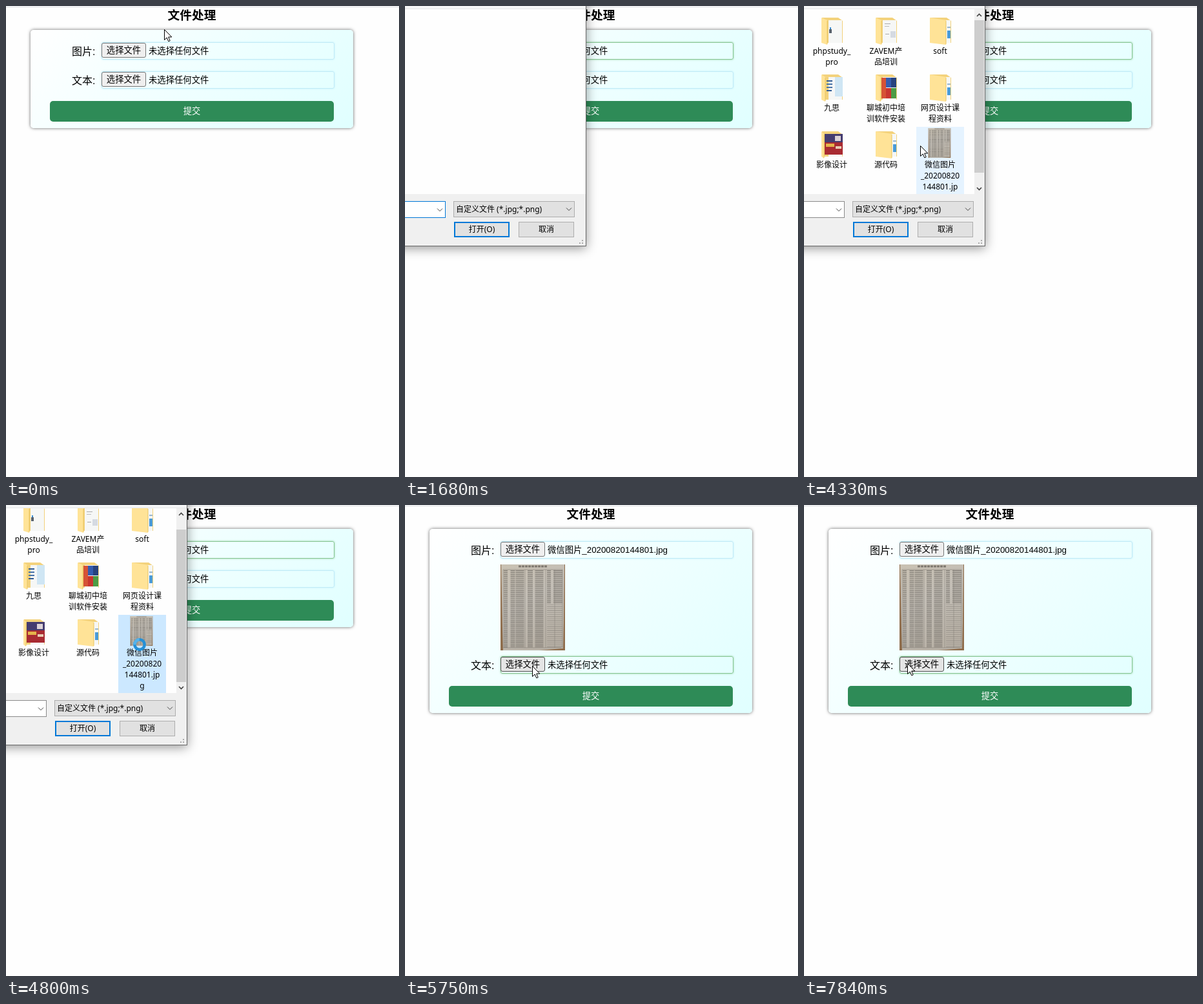
Write an HTML page that moves like this. It is 609 px wide and 729 px high and loops after 8000 ms.

```html
<!DOCTYPE html>
<html lang="zh">
<head>
<meta charset="utf-8">
<style>
  html, body { margin: 0; width: 100%; height: 100%; overflow: hidden; background: #fefefe; }
  body { position: relative; color: #000; font: 13.333px 'Liberation Sans', 'Noto Sans CJK SC', 'Noto Sans CJK', sans-serif; }
  div, span, svg { position: absolute; box-sizing: border-box; white-space: nowrap; }
  svg { overflow: visible; }
  #rule { top: 1px; width: 100%; height: 1px; background: #d9dce0; }
  #title { left: 188px; top: 3px; width: 200px; text-align: center; font-size: 18.72px; font-weight: bold; line-height: 24px; }
  #form { left: 38px; top: 37px; width: 500px; border-radius: 5px; box-shadow: 0 0 5px #666;
    background: linear-gradient(135deg, #fff, #e0ffff); }
  .label { left: 102px; font-size: 16px; line-height: 27px; top: 1px; }
  .row { left: 0; }
  .field { left: 148px; width: 361px; height: 27px; border: 1px solid #bfeaf7; border-radius: 3px; box-shadow: 0 0 3px #c4eefa; }
  .button { left: 148px; top: 1px; width: 69px; height: 23px; line-height: 21px; text-align: center;
    background: #efefef; border: 1px solid #767676; border-radius: 3px; }
  .name { left: 221px; line-height: 27px; }
  .hover .field { border-color: #86c592; box-shadow: 0 0 3px #90cf9b; }
  .hover .button { background: #e5e5e5; border-color: #4f4f4f; }
  .press .button { background: #f5f5f5; border-color: #8d8d8d; }
  #submit { left: 68px; width: 440px; height: 32px; line-height: 32px; text-align: center; color: #fff; background: #2e8b57; border-radius: 5px; }
  #preview { left: 148px; top: 92px; }

  #dialog { left: 0; top: 0; transform-origin: -150px 100px; font: 12px 'Noto Sans', 'Noto Sans CJK SC', 'Noto Sans CJK', sans-serif; }
  #frame { left: -600px; top: -400px; width: 881px; height: 772px; background: #f0f0f0; border: 1px solid #666; box-shadow: 0 3px 16px rgba(0,0,0,.42); }
  #bar { left: -599px; top: -60px; width: 879px; height: 65px; background: #f5f6f7; border-bottom: 1px solid #e6e7e8; }
  #list { left: -599px; top: 5px; width: 879px; height: 286px; background: #fefefe; overflow: hidden; }
  #files { left: 599px; top: -5px; }
  .item { width: 74px; height: 122px; }
  .caption { top: 50px; width: 74px; text-align: center; line-height: 17px; }
  .box { background: #e1e1e1; border: 1px solid #adadad; text-align: center; }
  #file-input { left: -300px; top: 302px; width: 363px; height: 26px; background: #fff; }
  #filter { left: 75px; top: 302px; width: 188px; height: 25px; line-height: 23px; text-align: left; padding-left: 3px; }
  #open { left: 76px; top: 334px; width: 86px; height: 24px; line-height: 20px; border: 2px solid #0078d7; }
  #cancel { left: 176px; top: 334px; width: 86px; height: 24px; line-height: 22px; }
</style>
</head>
<body>
<svg width="0" height="0">
  <defs>
    <linearGradient id="paper" x2=".4" y2="1">
      <stop stop-color="#c9c1b2"/><stop offset=".5" stop-color="#c3beb6"/><stop offset="1" stop-color="#b9b2a7"/>
    </linearGradient>
    <symbol id="photo" viewBox="0 0 100 133">
      <rect width="100" height="133" fill="#8f6d4c"/>
      <path d="M1 0H99L98 90 97 130 60 133H4L3 100Z" fill="url(#paper)"/>
      <path d="M28 3H73" stroke="#6d675f" stroke-width="3" stroke-dasharray="4 1" opacity=".8"/>
      <g id="columns" fill="none" stroke="#67635d" opacity=".6"></g>
    </symbol>
  </defs>
</svg>

<div id="rule"></div>
<div id="title">文件处理</div>
<div id="form"></div>
<div class="row" id="image-row" style="top:56px">
  <div class="field"></div><span class="label">图片:</span><div class="button">选择文件</div><span class="name"></span>
</div>
<svg id="preview" width="100" height="133"><use href="#photo"/></svg>
<div class="row" id="text-row">
  <div class="field"></div><span class="label">文本:</span><div class="button">选择文件</div><span class="name">未选择任何文件</span>
</div>
<div id="submit">提交</div>

<div id="dialog">
  <div id="frame"></div>
  <div id="bar"></div>
  <div id="list"><div id="files"></div></div>
  <div class="box" id="file-input"></div>
  <div class="box" id="filter">自定义文件 (*.jpg;*.png)</div>
  <div class="box" id="open">打开(O)</div>
  <div class="box" id="cancel">取消</div>
  <svg width="281" height="372" fill="none" stroke="#444">
    <circle cx="256" cy="-10.5" r="7.5" fill="#1e7fd6" stroke="none"/>
    <path d="M50 313.500l4 4 4-4M250 312.500l4 4 4-4"/>
    <path d="M275 362v8M271 366v4M267.500 370v0" stroke="#aaa" stroke-width="2" stroke-dasharray="2 2"/>
    <g id="scrollbar">
      <rect x="264" y="5" width="16" height="286" fill="#f0f0f0" stroke="none"/>
      <rect id="thumb" x="264" y="22" width="15" height="236" fill="#cdcdcd" stroke="none"/>
      <path d="M268 16l3.500-3.500 3.500 3.500M268 281l3.500 3.500 3.500-3.500" stroke-width="1.600"/>
    </g>
  </svg>
</div>

<svg id="cursor" width="13" height="20">
  <path id="arrow" d="M.5.500V16.500L4.200 13 6.800 18.800 9.200 17.800 6.700 12H11.800Z" fill="#fff" stroke="#000"/>
  <g id="busy" fill="none" stroke-width="4.500">
    <circle r="7.700" stroke="#2590d6"/>
    <path d="M0-7.700A7.700 7.700 0 0 1 7.700 0" stroke="#55b2ea"/>
  </g>
</svg>

<script>
const $ = id => document.getElementById(id);
const LOOP = 8000, TICK = 75, TICK_OFFSET = 20;
const OPEN_AT = 1190, CLOSE_AT = 4800, FADE = 200;
const FILE = '微信图片_20200820144801.jpg';

// Table printed on the photographed sheet: x, width, top, bottom
const columns = [[8, 6, 9, 130], [19, 7, 9, 128], [30, 13, 9, 128], [46, 8, 9, 128],
  [60, 13, 9, 128], [75, 6, 9, 60], [89, 14, 9, 60]];
$('columns').innerHTML = columns.map(([x, w, top, end]) =>
  `<path d="M${x} ${top}V${end}" stroke-width="${w}" stroke-dasharray="1.700 1.400"/>`).join('') +
  '<path d="M4 8H96M4 129H94" stroke-width=".7"/><path d="M84 62V128" stroke-width="24" stroke-dasharray=".6 2.500"/>' +
  '<path d="M4 8V129M38 8V129M70 8V129M84 8V129M96 8V129" stroke-width=".6"/>';

const rects = list => list.map(([x, y, w, h, fill]) =>
  `<rect x="${x}" y="${y}" width="${w}" height="${h}" fill="${fill}"/>`).join('');
const folder = (flap, marks) => `<svg width="74" height="50">
  <path d="M22 7H47L54 12V46H22Z" fill="#f3d27c"/>
  ${rects([[32, 11, 21, 35, '#f6f7f6'], ...marks])}
  <path d="M21 7L${21 + flap} 11V49L21 46Z" fill="#ffe397"/><path d="M${21 + flap} 12V48" stroke="#e8c45f"/></svg>`;
const closedFolder = folder(25, [[48, 21, 5, 2, '#9ab7cf'], [48, 27, 5, 12, '#4a9bd8']]);
const photo = '<svg x="0" width="74" height="50"><use href="#photo" x="18" y="2" width="36" height="46"/></svg>';

const items = [
  ['phpstudy_<br>pro', folder(9, [[33, 25, 4, 6, '#59636d'], [34, 22, 2, 3, '#3a8bd0']])],
  ['ZAVEM产<br>品培训', folder(9, [[35, 16, 9, 1, '#aaa'], [35, 20, 7, 1, '#bbb'], [44, 28, 8, 10, '#d5dae2'], [36, 32, 6, 1, '#aaa']])],
  ['soft', closedFolder],
  ['九思', folder(6, [[42, 11, 12, 30, '#cfe6f4'], [29, 16, 9, 2, '#315c94'], [29, 21, 9, 2, '#4773a8'], [29, 26, 9, 2, '#4773a8'], [29, 31, 8, 2, '#315c94']])],
  ['聊城初中培<br>训软件安装', folder(8, [[30, 12, 7, 32, '#d65235'], [37, 12, 8, 15, '#355caf'], [45, 12, 8, 15, '#27427e'], [37, 28, 8, 16, '#c93630'], [45, 28, 8, 16, '#4c9c45']])],
  ['网页设计课<br>程资料', closedFolder],
  ['影像设计', folder(4, [[26, 11, 28, 15, '#443c70'], [26, 24, 28, 19, '#a92b32'], [28, 26, 13, 5, '#e5b34b'], [42, 14, 9, 8, '#dbd2d7'], [43, 30, 9, 4, '#e8cdb3']])],
  ['源代码', closedFolder],
  ['微信图片<br>_20200820<br>144801.jp<br>g', photo],
];
$('files').innerHTML = items.map(([caption, icon], i) =>
  `<div class="item" style="left:${6 + i % 3 * 84}px;top:${11 + Math.floor(i / 3) * 88}px">${icon}<div class="caption">${caption}</div></div>`).join('');
const chosen = $('files').lastElementChild;

// time, x, y
const path = [[70, 245, 36], [360, 165, 64], [590, 165, 64], [1145, 165, 87], [1460, 165, 87], [1640, -20, 120],
  [4070, -20, 190], [4295, 180, 216], [4370, 180, 216], [4520, 207, 216], [5040, 207, 216], [5720, 197, 249],
  [6280, 197, 249], [6480, 120, 93], [6700, 64, 170], [6995, 160, 245]];

function cursorAt(t) {
  const next = path.findIndex(key => key[0] > t);
  if (next === 0) return path[0].slice(1);
  if (next < 0) return path[path.length - 1].slice(1);
  const [t0, x0, y0] = path[next - 1], [t1, x1, y1] = path[next];
  const p = (t - t0) / (t1 - t0), e = p * p * (3 - 2 * p);
  return [x0 + (x1 - x0) * e, y0 + (y1 - y0) * e];
}

const clamp = v => Math.min(1, Math.max(0, v));
const during = (t, from, to) => t >= from && t < to;
const show = (el, on) => { el.style.display = on ? '' : 'none'; };

function drawForm(t) {
  const loaded = t >= CLOSE_AT, shift = loaded ? 133 : 0;
  $('form').style.height = 152 + shift + 'px';
  $('text-row').style.top = 101 + shift + 'px';
  $('submit').style.top = 147 + shift + 'px';
  show($('preview'), loaded);
  $('image-row').querySelector('.name').textContent = loaded ? FILE : '未选择任何文件';
  const setState = (id, hover, press) => { $(id).className = `row${hover ? ' hover' : ''}${press ? ' press' : ''}`; };
  setState('image-row', during(t, 170, CLOSE_AT), during(t, 800, 890));
  setState('text-row', during(t, 5400, 6340) || t >= 6900, during(t, 7520, 7600) || during(t, 7670, 7750));
}

function drawDialog(t) {
  const opening = clamp((t - OPEN_AT) / FADE), closing = clamp((t - CLOSE_AT) / 195);
  const scale = 0.945 + 0.055 * (1 - (1 - opening) ** 2) - 0.042 * closing;
  const dialog = $('dialog');
  show(dialog, opening > 0 && closing < 1);
  dialog.style.opacity = opening * (1 - closing);
  dialog.style.transform = `scale(${scale})`;

  const listed = t >= 3530, selected = t >= 4560;
  show($('files'), listed);
  show($('scrollbar'), listed);
  $('files').style.top = (selected ? -22 : -5) + 'px';
  $('thumb').setAttribute('y', selected ? 38 : 22);
  chosen.style.background = selected ? '#cce8ff' : t >= 4290 ? '#e5f3ff' : '';
  $('file-input').style.borderColor = t < 3460 ? '#0078d7' : '#8a8a8a';
}

function drawCursor(t) {
  const [x, y] = cursorAt(t), busy = during(t, 4740, 5100);
  $('cursor').style.transform = `translate(${Math.round(x)}px, ${Math.round(y)}px)`;
  show($('arrow'), !busy);
  show($('busy'), busy);
  $('busy').setAttribute('transform', `rotate(${t * 0.36})`);
}

function frame() {
  const now = performance.now() % LOOP;
  const t = Math.max(0, TICK_OFFSET + TICK * Math.floor((now - TICK_OFFSET) / TICK));
  drawForm(t);
  drawDialog(t);
  drawCursor(t);
  requestAnimationFrame(frame);
}
$('cursor').style.left = $('cursor').style.top = 0;
frame();
</script>
</body>
</html>
```
